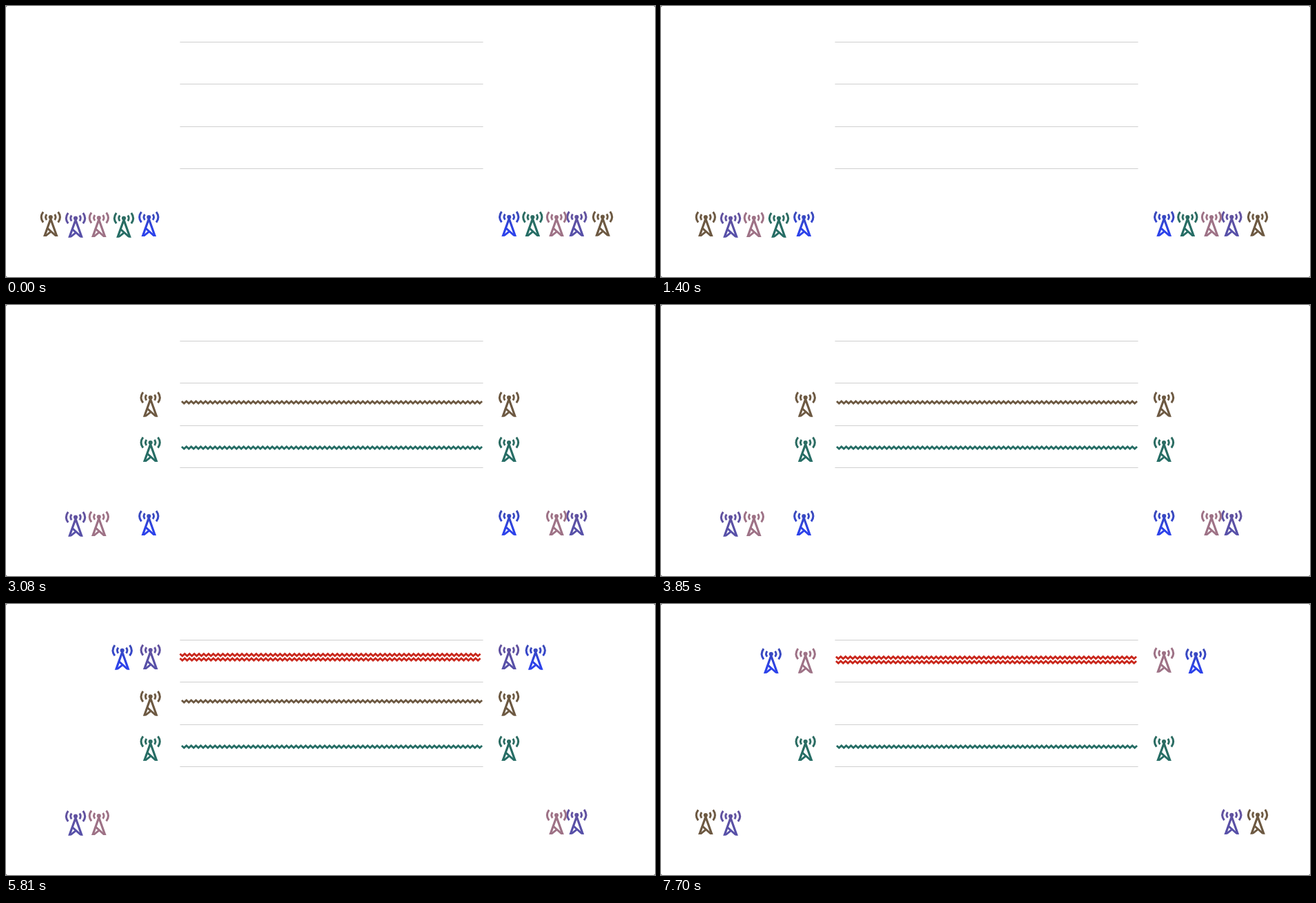
An HTML page that plays this animation: 942 by 394 pixels, repeating every 8 s.

```html
<!DOCTYPE html>
<html lang="en">
<head>
<meta charset="utf-8">
<title>Radio channels</title>
<style>
  html, body { margin: 0; width: 100%; height: 100%; overflow: hidden; background: #555; }
  svg { display: block; width: 942px; height: 394px; }
  #tower, .wave { fill: none; }
  .wave { stroke-width: 2.9; }
</style>
</head>
<body>
<svg viewBox="0 0 942 394">
  <defs id="defs">
    <clipPath id="feet"><rect x="-20" y="-12" width="40" height="40"/></clipPath>
    <g id="tower" clip-path="url(#feet)">
      <circle r="1.5" stroke-width="3.1"/>
      <path stroke-width="3" d="M-10.8 -7.7Q-16.5 0 -10.8 7.7M10.8 -7.7Q16.5 0 10.8 7.7"/>
      <path stroke-width="2.9" d="M-5.7 -4Q-8.9 0 -5.7 4M5.7 -4Q8.9 0 5.7 4"/>
      <path stroke-width="3.2" d="M-9.6 29.5L0 2.5L9.6 29.5"/>
      <path stroke-width="2.9" d="M-10 29.3L1.2 20.4M-4.6 16.2L10 29.3"/>
    </g>
  </defs>
  <rect width="942" height="394" rx="2.5" fill="#fff"/>
  <g id="lanes" fill="#cfcfcf"></g>
  <g id="scene"></g>
</svg>
<script>
const LOOP = 8000;
const [defs, lanes, scene] = ['defs', 'lanes', 'scene'].map(id => document.getElementById(id));

// colours at top and bottom, then the resting spots on the left and right
const radios = {
  brown:  ['#6d5942', '#6d5942', 64.8, 307, 866, 306.5],
  purple: ['#62529f', '#5750a8', 101, 308.5, 828.3, 306.7],
  pink:   ['#9e7286', '#9e7286', 134.8, 308, 799, 307],
  teal:   ['#2c6c62', '#266d65', 171, 308.5, 764.3, 307],
  blue:   ['#3b4abb', '#2c42ea', 207.3, 307, 730.2, 306.7]
};
const RED = '#c9271c';

function add(parent, tag, attrs) {
  const el = document.createElementNS('http://www.w3.org/2000/svg', tag);
  for (const k in attrs) el.setAttribute(k, attrs[k]);
  return parent.appendChild(el);
}

for (const name in radios) {
  const [top, bottom] = radios[name];
  const fade = add(defs, 'linearGradient',
    { id: name, gradientUnits: 'userSpaceOnUse', x1: 0, y1: -4, x2: 0, y2: 20 });
  add(fade, 'stop', { offset: 0, 'stop-color': top });
  add(fade, 'stop', { offset: 1, 'stop-color': bottom });
}

function pair(g, name, spots = radios[name].slice(2)) {
  const [lx, ly, rx, ry] = spots;
  for (const [x, y] of [[lx, ly], [rx, ry]]) {
    add(g, 'use', { href: '#tower', transform: `translate(${x} ${y})`, stroke: `url(#${name})` });
  }
}

function wave(g, y, stroke, x = 255) {
  const count = 126;
  const step = 436 / count;
  let d = '';
  for (let i = 0; i <= count; i++) {
    d += (i ? 'L' : 'M') + (x + i * step).toFixed(2) + ' ' + (y + (i % 2 ? 1.5 : -1.5));
  }
  add(g, 'path', { class: 'wave', d, stroke });
}

const lane = y => [209.7, y, 730, y];
const teal = { teal: lane(200) };
const brown = { brown: lane(134.5) };
const purple = { purple: lane(67) };
const tealWave = [207.5, radios.teal[1]];
const brownWave = [141.5, radios.brown[1]];
const purpleWave = [79.3, radios.purple[1]];

// start time, radios on air, waves, radios also shown at rest
const steps = [
  [0, {}, []],
  [560, teal, [tealWave]],
  [1330, {}, []],
  [2170, teal, [tealWave]],
  [3010, { ...teal, ...brown }, [tealWave, brownWave]],
  [4760, { ...teal, ...brown, ...purple }, [tealWave, brownWave, purpleWave]],
  [5740, { ...teal, ...brown, ...purple, blue: [168.7, 67.5, 768.7, 67.5] },
    [tealWave, brownWave, [74, RED, 252.5], [80.5, RED, 252.5]], ['purple']],
  [6720, { ...brown, ...purple }, [brownWave, purpleWave]],
  [7700, { ...teal, pink: [209.7, 72.5, 730, 71.5], blue: [159.8, 72.7, 776.3, 73] },
    [tealWave, [78, RED, 254], [84.5, RED, 254]]]
];

for (const y of [52, 113, 175, 236]) {
  add(lanes, 'rect', { x: 252.5, y, width: 440, height: 1 });
}

const views = steps.map(([, onAir, waves, idle = []]) => {
  const g = add(scene, 'g', { visibility: 'hidden' });
  for (const name in radios) {
    if (onAir[name]) pair(g, name, onAir[name]);
    if (!onAir[name] || idle.includes(name)) pair(g, name);
  }
  waves.forEach(w => wave(g, ...w));
  return g;
});

const start = performance.now();
function draw(now) {
  const t = Math.max(0, now - start) % LOOP;
  const current = steps.findLastIndex(s => s[0] <= t);
  views.forEach((g, i) => g.setAttribute('visibility', i === current ? 'visible' : 'hidden'));
  requestAnimationFrame(draw);
}
draw(start);
</script>
</body>
</html>
```
